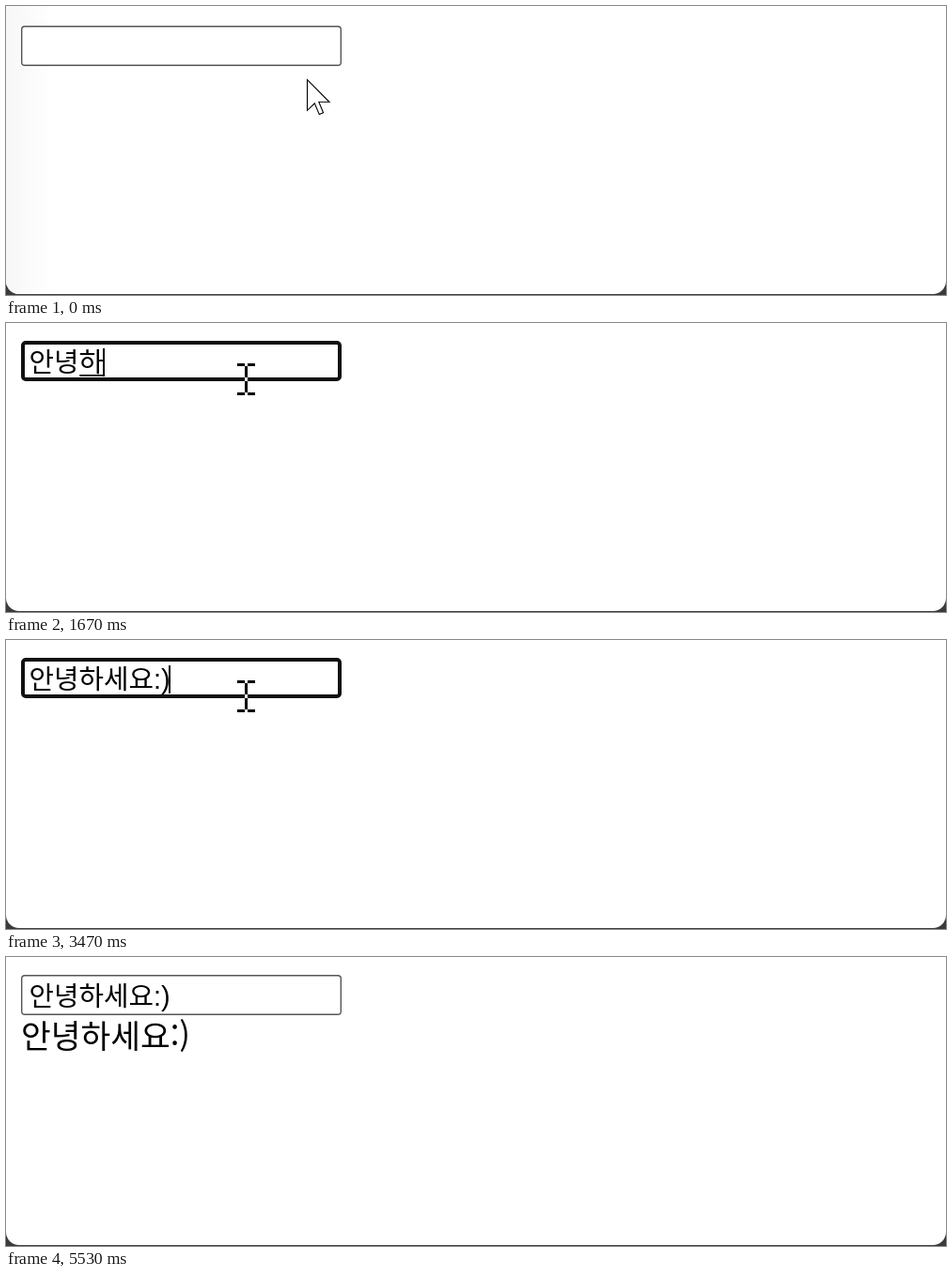
Write an HTML page that moves like this. It is 1000 px wide and 308 px high and loops after 5670 ms.

```html
<!DOCTYPE html>
<html lang="ko">
<meta charset="utf-8">
<title>Typing demo</title>
<style>
  html, body { margin: 0; height: 100%; overflow: hidden; background: #3b3b3d; }
  svg { display: block; width: 100vw; height: 100vh; isolation: isolate; }
  text { font-family: "Liberation Sans", "Noto Sans CJK KR", "Noto Sans CJK", sans-serif; font-weight: 300; white-space: pre; }
  #echo { font-family: "Noto Sans CJK KR", "Noto Sans CJK", sans-serif; }
  #beam { mix-blend-mode: difference; }
</style>
<svg viewBox="0 0 1000 308">
  <defs>
    <linearGradient id="fade"><stop stop-color="#f7f7f7"/><stop offset="1" stop-color="#fff"/></linearGradient>
  </defs>
  <rect y="-20" width="1000" height="327" rx="14" fill="#fff"/>
  <path id="shade" d="M0 0H50V307H14A14 14 0 0 1 0 293Z" fill="url(#fade)"/>
  <g id="field">
    <rect id="box" fill="#fff"/>
    <text id="typed" x="24.6" y="33" font-size="28.8"></text>
    <rect id="under" y="36" width="25" height="1.7"/>
    <rect id="caret" y="8" width="2" height="30"/>
  </g>
  <text id="echo" x="16" y="97" font-size="34.5">안녕하세요:)</text>
  <path id="beam" fill="#fff" d="M-9 -17h8v3h-8zM2 -17h8v3H2zM-1 -14h3v28h-3zM-9 14h8v3h-8zM2 14h8v3H2z"/>
  <path id="arrow" fill="#fff" stroke="#000" stroke-width="1.1" d="M.5 .5V33.3L8.3 25.8 13.3 37.6 17.6 35.7 12.8 24.3H24Z"/>
</svg>
<script>
const $ = id => document.getElementById(id);
const LOOP = 5670, STEP = 1000 / 15;

// [step, text, is the last syllable still being composed]
const typing = [
  [0, ''], [13, 'ㅇ', 1], [16, '아', 1], [17, '안', 1], [19, '안ㄴ', 1], [21, '안녕', 1],
  [25, '안녕하', 1], [28, '안녕하ㅅ', 1], [29, '안녕하세', 1], [31, '안녕하세ㅇ', 1],
  [33, '안녕하세요', 1], [45, '안녕하세요:'], [52, '안녕하세요:)']
];
// pointer: [step, x, y]
const path = [
  [0, 320, 78], [2, 292, 73], [4, 258, 61], [5, 255, 60], [72, 255, 60],
  [74, 251, 78], [76, 249, 107], [77, 240, 137], [80, 119, 290], [81, 80, 340]
];
const within = (n, a, b) => n >= a && n < b;
const show = (id, on) => $(id).style.display = on ? '' : 'none';
const attrs = (id, o) => { for (const k in o) $(id).setAttribute(k, o[k]); };

function pointer(n) {
  const i = path.findIndex(p => p[0] > n);
  if (i < 0) return path.at(-1).slice(1);
  const [a, x, y] = path[i - 1], [b, u, v] = path[i], k = (n - a) / (b - a);
  return [x + (u - x) * k, y + (v - y) * k].map(Math.round);
}

function draw(t) {
  const n = Math.floor((t + 4) / STEP);
  const [, text, composing] = typing.findLast(e => e[0] <= n);
  const focused = within(n, 6, 83), w = focused ? 4 : 1.4;

  attrs('field', { transform: `translate(0 ${text ? 19 : 21})` });
  attrs('box', {
    x: 16 + w / 2, y: w / 2, width: 341 - w, height: 43 - w, rx: focused ? 3 : 3.3,
    stroke: focused ? '#101010' : '#555', 'stroke-width': w
  });
  $('typed').textContent = text;

  const syllables = Math.min(text.length, 5), marks = text.length - syllables;
  attrs('under', { x: 25.2 + 26.5 * (syllables - 1) });
  show('under', composing);
  attrs('caret', { x: Math.floor(24 + 26.5 * syllables + 8.5 * marks) });
  show('caret', within(n, 6, 41) || within(n, 45, 59) || within(n, 67, 75));

  show('echo', n >= 67);
  attrs('echo', { fill: focused ? '#1a1a1a' : '#000' });
  show('shade', n < 1);

  const [x, y] = pointer(n), inside = y < 64;
  for (const id of ['beam', 'arrow']) attrs(id, { transform: `translate(${x} ${y})` });
  show('beam', inside);
  show('arrow', !inside);
}

function tick() {
  draw(performance.now() % LOOP);
  requestAnimationFrame(tick);
}
tick();
</script>
</html>
```
